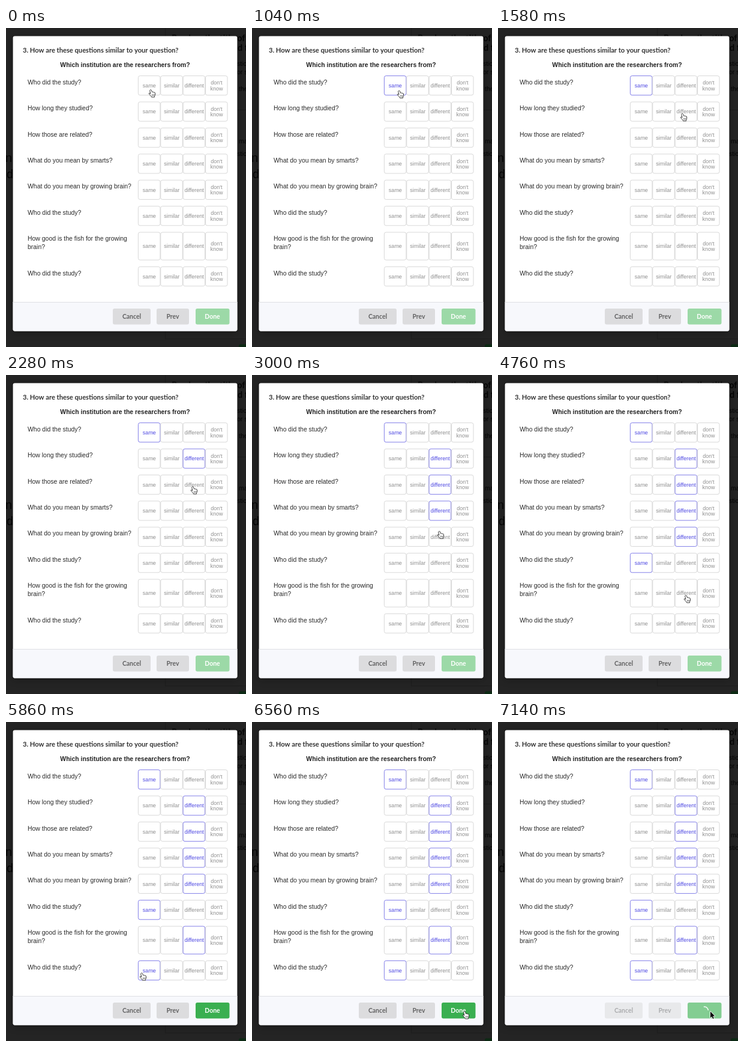
Recreate the animation shown at these times as an HTML page with a canvas. Size 400 by 531 pixels, loop 7160 ms.

```html
<!DOCTYPE html>
<html lang="en">
<head>
<meta charset="utf-8">
<title>Question similarity form</title>
<style>
  html, body { margin: 0; width: 100%; height: 100%; overflow: hidden; background: #242424; }
  canvas { display: block; width: 400px; height: 531px; }
</style>
</head>
<body>
<canvas id="stage"></canvas>
<script>
const LOOP = 7160;
const SANS = '"Liberation Sans", Arial, sans-serif';
const LATO = 'Lato, sans-serif';
const canvas = document.getElementById('stage');
const ctx = canvas.getContext('2d');
const dpr = window.devicePixelRatio || 1;
canvas.width = 400 * dpr;
canvas.height = 531 * dpr;

const LEFT = 220, CELL = 37.35, TOP = 79.2, PITCH = 43.4, LINE = 14;
const OPTIONS = [['same'], ['similar'], ['different'], ["don't", 'know']];

// pick: chosen option, at: click time
const rows = [
  { label: ['Who did the study?'], pick: 0, at: 540 },
  { label: ['How long they studied?'], pick: 2, at: 1940 },
  { label: ['How those are related?'], pick: 2, at: 2420 },
  { label: ['What do you mean by smarts?'], pick: 2, at: 2740 },
  { label: ['What do you mean by growing brain?'], pick: 2, at: 3220 },
  { label: ['Who did the study?'], pick: 0, at: 4040 },
  { label: ['How good is the fish for the growing', 'brain?'], pick: 2, at: 5240 },
  { label: ['Who did the study?'], pick: 0, at: 5740 }
];
let nextY = TOP;
for (const row of rows) {
  const extra = (row.label.length - 1) * LINE;
  row.y = nextY;
  row.h = 33 + extra;
  nextY += PITCH + extra;
}

const READY = 5740, SENT = 6660;
const done = { x: 316, y: 467, w: 56.5, h: 26.5 };

// Pointer path: time, x, y
const path = [
  [0, 237.5, 102], [180, 237.5, 102], [300, 241.5, 103.5], [1030, 241.5, 103.5],
  [1660, 306.5, 143.5], [1790, 306.5, 143.5], [1800, 305.5, 143.5], [2040, 305.5, 143.5],
  [2280, 307.5, 185], [2520, 307.5, 185], [2710, 308.5, 229], [2850, 308.5, 229],
  [3080, 308.5, 271], [3320, 308.5, 271], [3640, 314.5, 315], [3700, 314.5, 315],
  [3880, 223.5, 316], [4140, 223.5, 316], [4720, 308.5, 366], [4750, 308.5, 366],
  [4760, 309.5, 366], [5340, 309.5, 366], [5700, 222.5, 417], [5950, 222.5, 417],
  [6420, 350.5, 481], [LOOP, 350.5, 481]
];

const clamp = v => Math.max(0, Math.min(1, v));
const smooth = v => v * v * (3 - 2 * v);
const fade = (t, start) => smooth(clamp((t - start) / 110));
const mix = (a, b, k) => `rgb(${a.map((v, i) => Math.round(v + (b[i] - v) * k)).join(',')})`;

function pointerAt(t) {
  const i = path.findIndex((p, n) => n > 0 && t <= p[0]);
  const [t0, x0, y0] = path[i - 1], [t1, x1, y1] = path[i];
  const k = smooth((t - t0) / (t1 - t0));
  return { x: x0 + (x1 - x0) * k, y: y0 + (y1 - y0) * k };
}

function text(str, x, y, font, color, align = 'left') {
  ctx.font = font;
  ctx.fillStyle = color;
  ctx.textAlign = align;
  ctx.fillText(str, x, y);
}

function box(x, y, w, h, r, fill, stroke) {
  ctx.beginPath();
  ctx.roundRect(x, y, w, h, r);
  if (fill) { ctx.fillStyle = fill; ctx.fill(); }
  if (stroke) { ctx.strokeStyle = stroke; ctx.lineWidth = .8; ctx.stroke(); }
}

function rect(x, y, w, h, color) {
  ctx.fillStyle = color;
  ctx.fillRect(x, y, w, h);
}

function drawPage() {
  rect(0, 0, 400, 531, '#242424');
  rect(265, 0, 1, 518, '#1d1d1d');
  rect(265, 136, 135, 1, '#1d1d1d');
  rect(265, 517, 135, 1, '#1d1d1d');
  const ink = '#060606';
  const bold = `bold 14.4px ${LATO}`, small = `10.45px ${SANS}`, large = `20px ${SANS}`;
  text('Read on the title of', 398.5, 22, bold, ink, 'right');
  text('d from', 386, 38, bold, ink);
  text('stics', 385, 63, small, ink);
  text('or so', 385, 77, small, ink);
  text('the', 388, 105, small, ink);
  text('many', 388, 192, small, ink);
  text('stics', 385, 213, small, ink);
  text('n', 10, 223, large, ink, 'right');
  text('d', 12, 250, large, ink, 'right');
  box(388, 526.5, 30, 20, 3, '#0c2a14');
}

function drawModal() {
  ctx.save();
  ctx.shadowColor = 'rgba(0,0,0,.35)';
  ctx.shadowBlur = 13 * dpr;
  ctx.shadowOffsetY = 2 * dpr;
  box(11.6, 13.6, 373.8, 490.8, 3, '#fff');
  ctx.restore();
  box(11.6, 456, 373.8, 48.4, [0, 0, 3, 3], '#f7f8fc');
  rect(11.6, 456, 373.8, 1, '#dfe0e3');
  text('3. How are these questions similar to your question?', 28, 41, `bold 11.16px ${LATO}`, '#333');
  text('Which institution are the researchers from?', 198.5, 65, `bold 10.45px ${SANS}`, '#222', 'center');
}

function drawRow({ y, h, label, pick, at }, t) {
  label.forEach((s, i) => text(s, 36, y + 14.6 + i * LINE, `10.45px ${SANS}`, '#2a2a2a'));
  const on = fade(t, at);
  OPTIONS.forEach((lines, i) => {
    const k = i === pick ? on : 0;
    const x = LEFT + CELL * i;
    box(x + .4, y + .4, CELL - .8, h - .8, 3, '#fff', mix([206, 206, 206], [98, 94, 226], k));
    const color = mix([143, 143, 143], [78, 73, 226], k);
    const base = y + h / 2 + 3.2 - (lines.length - 1) * 4.6;
    lines.forEach((s, n) =>
      text(s, x + CELL / 2 + .2, base + n * 9.2, `9px ${SANS}`, color, 'center'));
  });
}

function drawButtons(t) {
  const font = `bold 10.45px ${LATO}`;
  const sent = fade(t, SENT);
  const grey = mix([220, 220, 222], [232, 233, 235], sent);
  const ink = mix([98, 98, 99], [171, 172, 174], sent);
  box(178, 467, 63, 26.5, 3, grey);
  box(251, 467, 54, 26.5, 3, grey);
  text('Cancel', 209.5, 484, font, ink, 'center');
  text('Prev', 278, 484, font, ink, 'center');

  const green = t < SENT
    ? mix([156, 217, 167], [58, 175, 80], fade(t, READY))
    : mix([58, 175, 80], [131, 205, 146], sent);
  box(done.x, done.y, done.w, done.h, 3, green);
  if (t < SENT) {
    text('Done', 344, 484, font, '#fff', 'center');
  } else {
    const mid = -0.9 + (t - 7140) / 600 * Math.PI * 2;
    ctx.beginPath();
    ctx.arc(344, 480.3, 6.3, mid - .85, mid + .85);
    ctx.strokeStyle = 'rgba(255,255,255,.9)';
    ctx.lineWidth = 1.6;
    ctx.stroke();
  }
}

const hand = new Path2D('M3 1Q4.3.3 5 1.7L6 4.7Q7 4 7.8 4.9Q8.8 4.3 9.4 5.3Q10.8 4.9 11 6.3V9Q10.8 10.5 10 11.5V13H5Q4.5 11.5 3 10L.8 7.6Q.3 6.4 1.6 6.4L3.4 7.4L2.2 2.6Q2 1.4 3 1Z');
const creases = new Path2D('M6 8.3V11M7.6 8.3V11M9.2 8.3V11');
const arrow = new Path2D('M0 0V10.4L2.4 8.2L4.1 12L5.8 11.2L4.1 7.6H7.4Z');

function drawPointer(t) {
  const { x, y } = pointerAt(t);
  const tipX = x + 3.5, tipY = y + 1;
  const inside = (bx, by, w, h) => tipX >= bx && tipX <= bx + w && tipY >= by && tipY <= by + h;
  const link = rows.some(r => inside(LEFT, r.y, CELL * 4, r.h)) ||
    (t >= READY && t < SENT && inside(done.x, done.y, done.w, done.h));
  ctx.save();
  ctx.lineJoin = 'round';
  if (link) {
    ctx.translate(x, y);
    ctx.fillStyle = '#fff';
    ctx.fill(hand);
    ctx.strokeStyle = '#222';
    ctx.lineWidth = .9;
    ctx.stroke(hand);
    ctx.lineWidth = .6;
    ctx.stroke(creases);
  } else {
    ctx.translate(tipX, tipY);
    ctx.strokeStyle = '#fff';
    ctx.lineWidth = 1.5;
    ctx.stroke(arrow);
    ctx.fillStyle = '#000';
    ctx.fill(arrow);
  }
  ctx.restore();
}

function frame(now) {
  const t = now % LOOP;
  ctx.setTransform(dpr, 0, 0, dpr, 0, 0);
  drawPage();
  drawModal();
  rows.forEach(row => drawRow(row, t));
  drawButtons(t);
  drawPointer(t);
}

let start;
function tick(now) {
  start ??= now;
  frame(now - start);
  requestAnimationFrame(tick);
}
frame(0);
requestAnimationFrame(tick);
</script>
</body>
</html>
```
